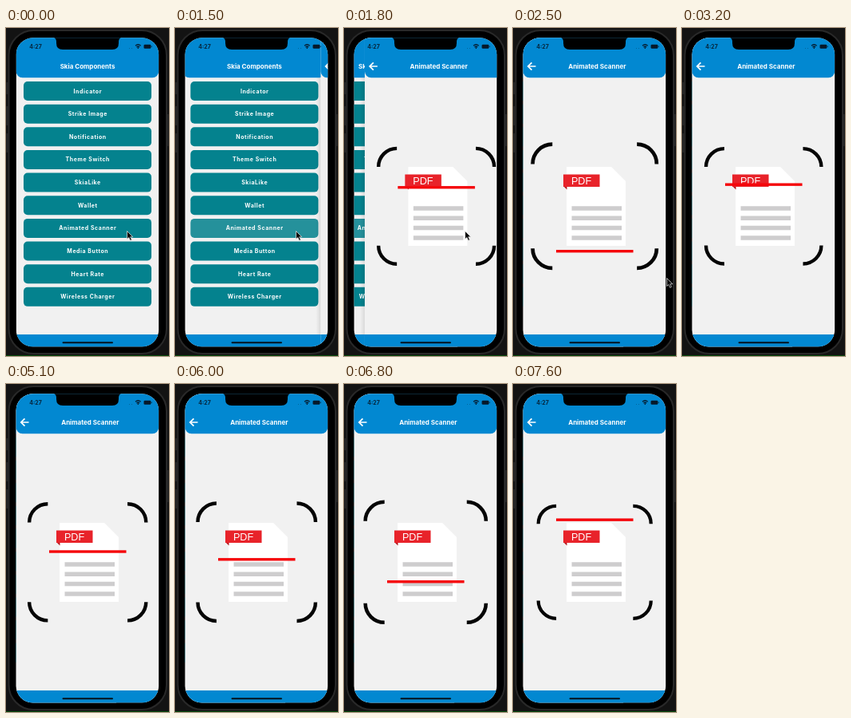
An HTML page for the animation above (7.7 s loop, 204 by 411 pixels).

```html
<!DOCTYPE html>
<html lang="en">
<head>
<meta charset="utf-8">
<title>Animated Scanner</title>
<style>
  html, body { margin: 0; width: 100%; height: 100%; overflow: hidden; background: #131313; }
  svg { display: block; width: 100%; height: 100%; }
  text { font-family: Inter, "Open Sans", sans-serif; font-weight: 700; fill: #fff; }
  .title { font-size: 8px; text-anchor: middle; }
  .label { font-size: 7px; letter-spacing: .55px; text-anchor: middle; }
  .bar { fill: #0288d1; }
  .page { fill: #f1f1f1; }
  .button { fill: #04828e; }
  .soft { filter: blur(.4px); }
</style>
</head>
<body>
<svg viewBox="0 0 204 411">
  <defs>
    <clipPath id="display"><rect x="12.6" y="12.3" width="178.6" height="387" rx="21"/></clipPath>
    <linearGradient id="shade"><stop offset="0" stop-opacity="0"/><stop offset="1" stop-opacity=".1"/></linearGradient>
    <g id="chrome">
      <rect class="page" x="12.6" y="12" width="179" height="388"/>
      <rect class="bar" x="12.6" y="0" width="178.6" height="62.3" rx="8"/>
      <rect class="bar" x="12.6" y="384" width="179" height="16"/>
    </g>
    <path id="corner" d="M-77.7 -53A24.7 24.7 0 0 1 -53 -77.7" fill="none" stroke="#050505" stroke-width="4.700"/>
  </defs>

  <g class="soft">
    <!-- phone body -->
    <rect x="-5" y="-5" width="214" height="421" fill="#131313"/>
    <path d="M1.5 68v15M1.5 98v24M1.5 132v24M202.5 108v40" stroke="#292929" stroke-width="2"/>
    <rect x="3.500" y="3" width="197.500" height="405" rx="31" fill="#000" stroke="#292929" stroke-width="2"/>
    <rect y="410" width="204" height="1" fill="#064a0c"/>

    <g clip-path="url(#display)">
      <g id="menu">
        <use href="#chrome"/>
        <text class="title" x="102" y="51">Skia Components</text>
        <g id="buttons"></g>
      </g>
      <g id="scanner">
        <rect x="6.600" y="62" width="6" height="322" fill="url(#shade)"/>
        <use href="#chrome"/>
        <text class="title" x="105.300" y="51">Animated Scanner</text>
        <path d="M28.500 48H19M23.500 43.300L18.800 48l4.700 4.700" fill="none" stroke="#fff" stroke-width="1.700"/>
        <g id="corners"></g>
        <path d="M67 174h56l18 18v81H67z" fill="#fff"/>
        <path d="M63 198h4.500v4.500z" fill="#b5141b"/>
        <rect x="63" y="183.500" width="45.500" height="15.500" fill="#e8232a"/>
        <text x="85.500" y="195.800" text-anchor="middle" style="font-size:12.6px;font-weight:400;font-family:'Liberation Sans',sans-serif">PDF</text>
        <path d="M73.500 226h62.500M73.500 238.300h62.500M73.500 250.500h62.500M73.500 263h62.500" stroke="#cecdce" stroke-width="5.600"/>
        <rect id="beam" x="54" y="-1.700" width="96.500" height="3.400" fill="#f5060b"/>
      </g>

      <!-- status bar, notch and home indicator -->
      <path d="M57 11q6 1 6 6v2q0 8 8 8h62q8 0 8-8V17q0-5 6-6z" fill="#000"/>
      <text x="29.300" y="26.300" style="font-size:7px;fill:#06263d">4:27</text>
      <g fill="none" stroke="#06192a">
        <path d="M162 22.300q3.300-3 6.600 0M163.500 24q1.800-1.600 3.600 0" stroke-width="1.300"/>
        <path d="M165.300 24.500v1.500" stroke-width="1.300"/>
        <path d="M154 25.500h1M157 25.500h1" opacity=".3"/>
      </g>
      <rect x="172.500" y="20.800" width="8.800" height="4.900" rx="1.300" fill="#06192a"/>
      <rect x="181.700" y="22.400" width=".8" height="1.700" fill="#06192a"/>
      <rect x="70.500" y="393.200" width="63.500" height="2" rx="1" fill="#05121c"/>
    </g>

    <path id="cursor" d="M0 0v10l2.300-2 1.700 3.800 1.900-.9-1.700-3.600h3.100z" fill="#080808" stroke="#eee" stroke-width=".7"/>
  </g>
</svg>
<script>
  const LOOP = 7700, STEP = 100;
  const PUSH_START = 1473, SCAN_START = 1477, SWEEP = 1008;
  const WIDTH = 178.5;
  const $ = id => document.getElementById(id);
  const clamp = x => Math.max(0, Math.min(1, x));
  const mix = (a, b, k) => a + (b - a) * k;
  const move = (id, x, y, extra = '') => $(id).setAttribute('transform', `translate(${x} ${y}) ${extra}`);

  const names = ['Indicator', 'Strike Image', 'Notification', 'Theme Switch', 'SkiaLike', 'Wallet',
    'Animated Scanner', 'Media Button', 'Heart Rate', 'Wireless Charger'];
  $('buttons').innerHTML = names.map((name, i) => `<g transform="translate(102 ${79 + i * 28.65})">
    <rect class="button" x="-80" y="-12" width="160" height="24" rx="5"/>
    <text class="label" x=".3" y="2.5">${name}</text></g>`).join('');
  const pressed = $('buttons').children[names.indexOf('Animated Scanner')];

  $('corners').innerHTML = [0, 90, 180, 270]
    .map(angle => `<use href="#corner" transform="rotate(${angle})"/>`).join('');

  // Critically damped spring, as in a native screen push
  function spring(ms) {
    const k = Math.max(0, ms) * .013;
    return 1 - Math.exp(-k) * (1 + k);
  }

  // Constant speed down and back up: 0 at the top, 1 at the bottom
  function sweep(ms) {
    const phase = Math.max(0, ms) / SWEEP % 2;
    return 1 - Math.abs(1 - phase);
  }

  function draw(t) {
    const push = spring(t - PUSH_START);
    move('menu', -.3 * WIDTH * push, 0);
    move('scanner', WIDTH * (1 - push), 0);
    $('scanner').style.display = push > 0 ? '' : 'none';
    pressed.style.opacity = 1 - .14 * clamp((t - 1100) / 200);

    const scan = sweep(t - SCAN_START);
    move('beam', 0, mix(161.2, 281.5, scan));
    move('corners', 102.2, 223.3, `scale(${mix(.9, 1, scan)})`);

    const k = clamp((t - 1800) / 600), glide = k * k * (3 - 2 * k);
    move('cursor', mix(151.5, 192.5, glide), mix(254.5, 313.5, glide));
    $('cursor').style.display = t < 2600 ? '' : 'none';
  }

  function tick(now) {
    draw(Math.floor(now % LOOP / STEP) * STEP);
    requestAnimationFrame(tick);
  }
  tick(performance.now());
</script>
</body>
</html>
```
